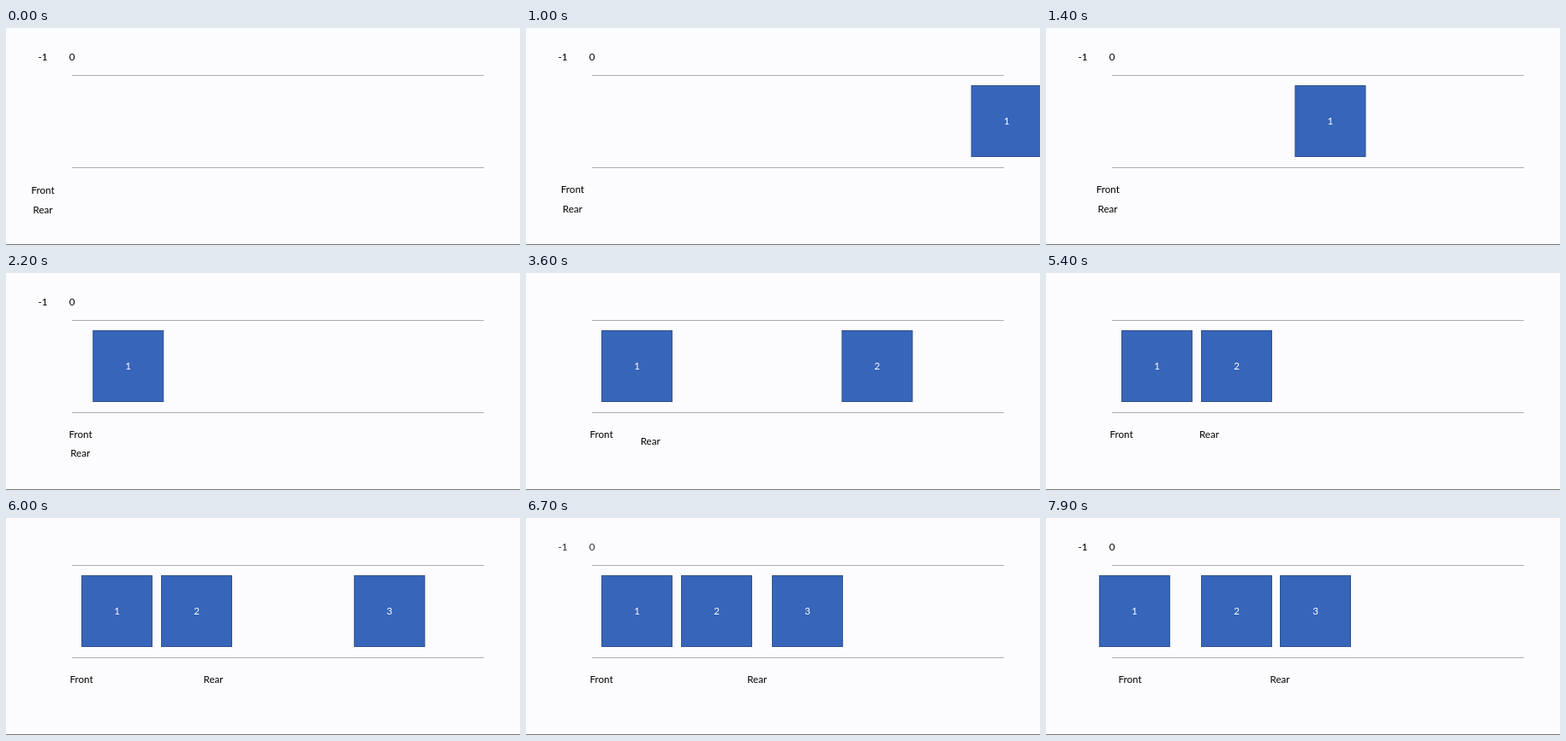
Recreate the animation shown at these times as an HTML page. Size 600 px wide and 254 px high, loop 8000 ms.

```html
<!DOCTYPE html>
<html lang="en">
<head>
<meta charset="utf-8">
<title>Queue</title>
<style>
  html, body { margin: 0; width: 100%; height: 100%; overflow: hidden; background: #fcfcfe; }
  svg { display: block; width: 100vw; height: 100vh; }
  text { font: 11.6px Lato, "Open Sans", sans-serif; text-anchor: middle; fill: #000; }
  .block rect { fill: #3765ba; stroke: #2f528f; }
  .block text { fill: #fff; }
</style>
</head>
<body>
<svg viewBox="0 0 600 254">
  <rect width="600" height="254" fill="#fcfcfe"/>
  <rect x="77" y="55" width="481" height="1" fill="#aeaeb0"/>
  <rect x="77" y="163" width="481" height="1" fill="#aeaeb0"/>
  <rect y="253" width="600" height="1" fill="#7c787b"/>
  <g id="labels">
    <text x="43" y="37.7">-1</text>
    <text x="77" y="37.7">0</text>
  </g>
  <g id="blocks"></g>
  <text id="front">Front</text>
  <text id="rear">Rear</text>
</svg>
<script>
const LOOP = 8000, STEP = 100, MORPH = 2020;
const STARTS = [545, 2784, 5127, 7632];

// Position of each part before and after every slide change
const blockStops = [
  [665, 88, 88, 88, -175],
  [670, 670, 181, 181, 181],
  [669, 669, 669, 273, 273]
];
const frontStops = {
  x: [43, 88, 88, 88, 189],
  y: [193.7, 192.7, 192.7, 192.7, 192.7]
};
const rearStops = {
  x: [43, 87.7, 181, 273, 273],
  y: [216.5, 215, 192.7, 192.7, 192.7]
};

const $ = id => document.getElementById(id);
const clamp = v => Math.min(1, Math.max(0, v));
const bezier = (s, a, b) => 3 * a * s * (1 - s) ** 2 + 3 * b * s * s * (1 - s) + s ** 3;

function ease(u) {
  if (u <= 0 || u >= 1) return clamp(u);
  let lo = 0, hi = 1;
  for (let i = 0; i < 24; i++) {
    const mid = (lo + hi) / 2;
    if (bezier(mid, 0.33, 0.3) < u) lo = mid; else hi = mid;
  }
  return bezier(lo, 0.1, 1);
}

const blocks = blockStops.map((_, i) => {
  const g = document.createElementNS("http://www.w3.org/2000/svg", "g");
  g.setAttribute("class", "block");
  g.innerHTML = `<rect x=".5" y="67.5" width="82" height="83"/><text x="41.5" y="113.2">${i + 1}</text>`;
  $("blocks").append(g);
  return g;
});

function draw(t) {
  const phase = STARTS.map(s => clamp((t - s) / MORPH));
  const eased = phase.map(ease);
  const at = stops => eased.reduce((v, p, i) => v + (stops[i + 1] - stops[i]) * p, stops[0]);
  const move = (el, x, y) => el.setAttribute("transform", `translate(${x.toFixed(2)} ${y.toFixed(2)})`);

  blocks.forEach((g, i) => move(g, at(blockStops[i]), 0));
  move($("front"), at(frontStops.x), at(frontStops.y));
  move($("rear"), at(rearStops.x), at(rearStops.y));

  const fadeOut = clamp(phase[1] / 0.35);
  const fadeIn = clamp((phase[2] - 0.45) / 0.4);
  $("labels").setAttribute("opacity", 1 - fadeOut + fadeIn);
}

const origin = performance.now();
function tick() {
  const t = (performance.now() - origin) % LOOP;
  draw(Math.floor(t / STEP) * STEP);
  requestAnimationFrame(tick);
}
tick();
</script>
</body>
</html>
```
